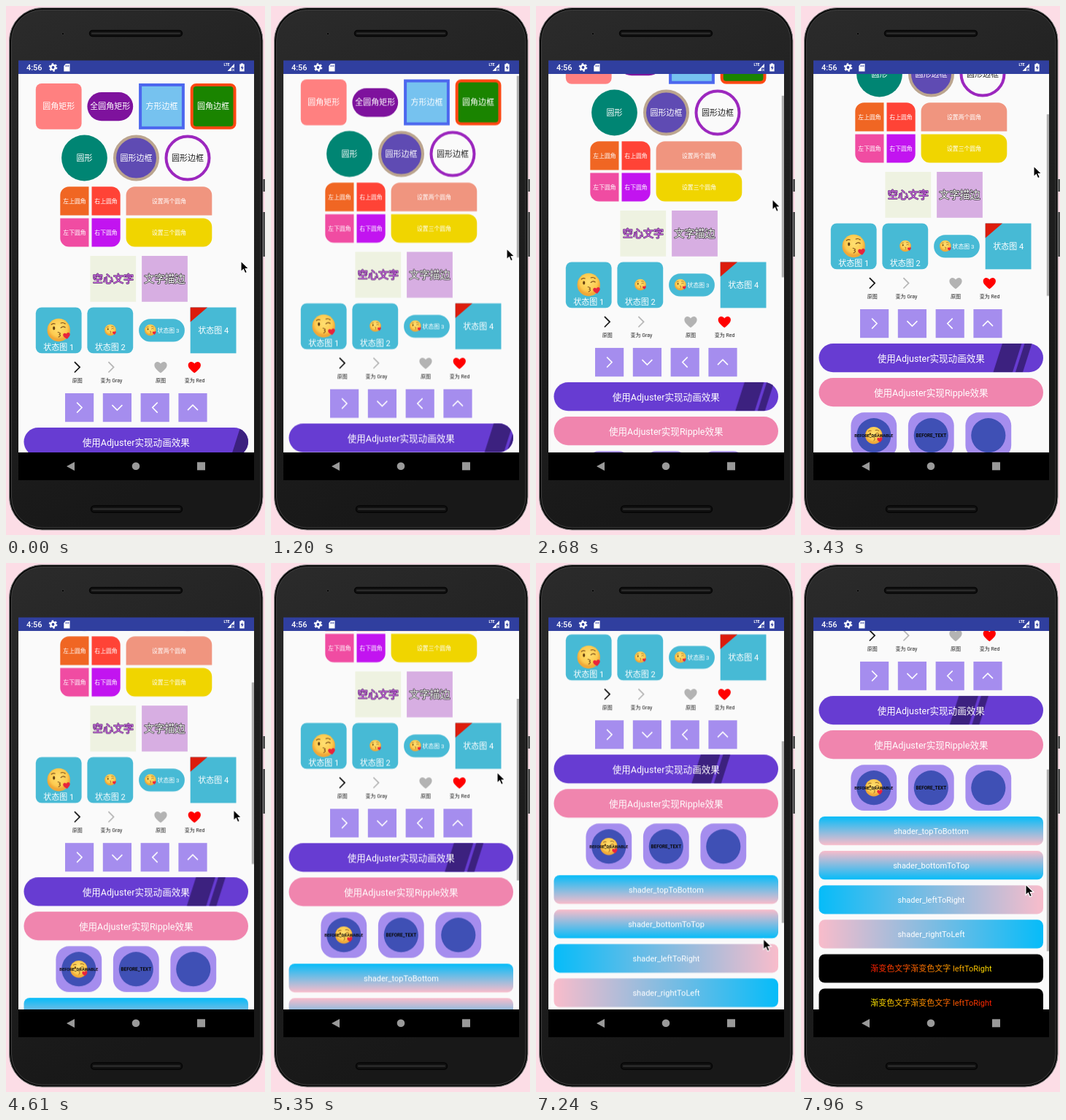
Write an HTML page that moves like this. It is 355 px wide and 724 px high and loops after 8 s.

```html
<!DOCTYPE html>
<html lang="zh-CN">
<head>
<meta charset="utf-8">
<style>
  html, body { margin: 0; width: 100%; height: 100%; overflow: hidden; background: #fcdde6; }
  svg { display: block; width: 355px; height: 724px; }
  text { font-family: Roboto, "Noto Sans CJK SC", "Noto Sans CJK", sans-serif; text-anchor: middle; }
</style>
</head>
<body>
<svg viewBox="0 0 355 724" xmlns="http://www.w3.org/2000/svg">
  <defs>
    <linearGradient id="body" x2=".3" y2="1">
      <stop stop-color="#2b2b2b"/><stop offset=".5" stop-color="#202020"/><stop offset="1" stop-color="#181818"/>
    </linearGradient>
    <linearGradient id="right"><stop stop-color="#06bcf9"/><stop offset="1" stop-color="#f9bccb"/></linearGradient>
    <linearGradient id="left" x1="1" x2="0"><stop stop-color="#06bcf9"/><stop offset="1" stop-color="#f9bccb"/></linearGradient>
    <linearGradient id="down" x2="0" y2="1"><stop stop-color="#06bcf9"/><stop offset="1" stop-color="#f9bccb"/></linearGradient>
    <linearGradient id="up" x2="0" y1="1" y2="0"><stop stop-color="#06bcf9"/><stop offset="1" stop-color="#f9bccb"/></linearGradient>
    <linearGradient id="warm"><stop stop-color="#ff1a00"/><stop offset="1" stop-color="#ffe600"/></linearGradient>
    <linearGradient id="warmBack"><stop stop-color="#ffee00"/><stop offset="1" stop-color="#ff1a00"/></linearGradient>
    <radialGradient id="skin" cy=".4"><stop stop-color="#ffe072"/><stop offset=".75" stop-color="#fdcb50"/><stop offset="1" stop-color="#f0a838"/></radialGradient>
    <clipPath id="screen"><rect x="17" y="93" width="323" height="518"/></clipPath>
    <clipPath id="pill"><rect x="24.5" y="577" width="307.5" height="39.2" rx="19.6"/></clipPath>
    <path id="heart" d="M0 7.5C-5 3.5-8.3.6-8.3-3C-8.3-7.8-2.4-8.8 0-4.8C2.4-8.8 8.3-7.8 8.3-3C8.3.6 5 3.5 0 7.5Z"/>
    <g id="kiss">
      <circle r="15.7" fill="url(#skin)"/>
      <g fill="none" stroke="#7a4c18" stroke-width="1.1" stroke-linecap="round">
        <path d="M-10-7.5Q-8-9.5-5-8.5M3-9.5Q6-11 9-8.5M3-3Q6-6 9-3.5M-1 3Q4 4 1 6Q4 7.5 0 9.5"/>
      </g>
      <ellipse cx="-6.5" cy="-2.5" rx="1.6" ry="2.4" fill="#65400f"/>
      <use href="#heart" transform="translate(11 8) rotate(-8) scale(.58)" fill="#e8243c"/>
    </g>
  </defs>

  <g fill="#4c4c4c"><rect x="351" y="237" width="4" height="17"/><rect x="351" y="282" width="4" height="61"/></g>
  <rect x="4.5" y="2.5" width="347.5" height="714.5" rx="45" fill="#0b0b0b" stroke="#858585"/>
  <rect x="7.5" y="5.5" width="341.5" height="708.5" rx="42" fill="url(#body)" stroke="#484848" stroke-width=".8"/>
  <g fill="#111" stroke="#050505" stroke-width="1.5">
    <rect x="114.5" y="33.5" width="127" height="8" rx="4"/>
    <rect x="116.5" y="684" width="125" height="9" rx="4.5"/>
  </g>
  <path d="M118 37.5H238M120 688.5H238" stroke="#303030" stroke-width="2" stroke-linecap="round"/>
  <circle cx="78" cy="38" r="1.8" fill="#0a0a0a" stroke="#444" stroke-width=".6"/>

  <rect x="17" y="93" width="323" height="518" fill="#fafafa"/>
  <g clip-path="url(#screen)">
    <g id="page"></g>
    <rect id="bar" x="336.8" y="93" width="3.2" height="248.5" fill="#b0b0b0"/>
  </g>

  <rect x="17" y="74.5" width="323" height="18.5" fill="#303f9f"/>
  <g id="status" fill="#fff">
    <circle cx="64.5" cy="84" r="3.1" fill="none" stroke="#fff" stroke-width="2.4"/>
    <circle cx="64.5" cy="84" r="4.9" fill="none" stroke="#fff" stroke-width="1.8" stroke-dasharray="2.5 2.63"/>
    <path d="M82 79H87.5V89.5H79.3V82Z"/>
    <path d="M81.9 81v2.2M83.8 81v2.2M85.7 81v2.2" stroke="#303f9f" stroke-width=".9"/>
    <path d="M313 79V84.5H309V89H303.5Z"/>
    <path d="M310 86l3 3m0-3l-3 3" stroke="#fff" stroke-width="1"/>
    <path d="M322 78.5h3v1h1.7v10h-6.4v-10H322Z"/>
    <path d="M324.2 81l-2.4 4h1.5v3l2.3-4h-1.4Z" fill="#303f9f"/>
  </g>
  <rect x="17" y="611" width="323" height="38"/>
  <g fill="#999"><path d="M94 624V636L83 630Z"/><circle cx="178" cy="629.8" r="5.3"/><rect x="262" y="624.3" width="11" height="11"/></g>

  <path id="cursor" d="M0 0V14.6L3.4 11.5L5.7 16.8L8.4 15.6L6.1 10.5H10.8Z" stroke="#fff" stroke-width="1.1"/>
</svg>
<script>
const LOOP = 8000;
const page = document.getElementById('page');
const parts = [];
const add = s => parts.push(s);

const rect = (x, y, w, h, fill, r = 0, extra = '') =>
  add(`<rect x="${x}" y="${y}" width="${w}" height="${h}" rx="${r}" fill="${fill}" ${extra}/>`);
const circle = (x, y, r, fill, extra = '') => add(`<circle cx="${x}" cy="${y}" r="${r}" fill="${fill}" ${extra}/>`);
const label = (s, x, y, size = 11, fill = '#fff', extra = '') =>
  add(`<text x="${x}" y="${y + size * 0.36}" font-size="${size}" fill="${fill}" ${extra}>${s}</text>`);
const use = (id, x, y, scale, fill = '') =>
  add(`<use href="#${id}" transform="translate(${x} ${y}) scale(${scale})" fill="${fill}"/>`);
const chevron = (x, y, turn, size, color, width) =>
  add(`<path d="M${-size / 2} ${-size}L${size / 2} 0L${-size / 2} ${size}" transform="translate(${x} ${y}) rotate(${turn})" fill="none" stroke="${color}" stroke-width="${width}"/>`);
// Corner radii run clockwise from the top left.
const corners = (x, y, w, h, fill, [a, b, c, d]) =>
  add(`<path fill="${fill}" d="M${x + a} ${y}h${w - a - b}a${b} ${b} 0 0 1 ${b} ${b}v${h - b - c}a${c} ${c} 0 0 1 ${-c} ${c}h${c + d - w}a${d} ${d} 0 0 1 ${-d} ${-d}v${a + d - h}a${a} ${a} 0 0 1 ${a} ${-a}z"/>`);

const BOX = 62.8, COLS = [40.8, 111.4, 182.1, 252.7];
const mid = i => COLS[i] + BOX / 2;

// Rounded and bordered boxes
rect(COLS[0], 106, BOX, BOX, '#ff8080', 8);
rect(COLS[1], 118, BOX, 39.2, '#7e129d', 19.6);
rect(COLS[2] + 2, 108, BOX - 4, BOX - 4, '#76c2ef', 0, 'stroke="#4c67ee" stroke-width="4"');
rect(COLS[3] + 2, 108, BOX - 4, BOX - 4, '#1a8400', 6, 'stroke="#ff4712" stroke-width="4"');
['圆角矩形', '全圆角矩形', '方形边框', '圆角边框'].forEach((s, i) => label(s, mid(i), 137.5));

// Circles
circle(107.5, 208, 31.4, '#008573');
circle(178.5, 208, 29.5, '#5f4bb3', 'stroke="#bba58f" stroke-width="4"');
circle(249, 208, 29.5, '#fafafa', 'stroke="#9c27be" stroke-width="4"');
label('圆形', 107.5, 208);
label('圆形边框', 178.5, 208);
label('圆形边框', 249, 208, 11, '#222');

// Single corners
corners(74.3, 247.2, 39.2, 39.2, '#f06623', [12, 0, 0, 0]);
corners(117.5, 247.2, 39.2, 39.2, '#ff4336', [0, 12, 0, 0]);
corners(74.3, 290.4, 39.2, 39.2, '#f04ca2', [0, 0, 0, 12]);
corners(117.5, 290.4, 39.2, 39.2, '#c214f0', [0, 0, 12, 0]);
corners(164.6, 247.2, 117.7, 39.2, '#f0957f', [12, 12, 0, 0]);
corners(164.6, 290.4, 117.7, 39.2, '#f0d500', [0, 12, 12, 12]);
[['左上圆角', '右上圆角', '设置两个圆角'], ['左下圆角', '右下圆角', '设置三个圆角']].forEach((row, r) =>
  row.forEach((s, i) => label(s, [94, 137, 223.5][i], 267.2 + r * 43.2, 7.85)));

// Outlined text
rect(115.4, 342, BOX, BOX, '#eef2e1');
rect(186.1, 342, BOX, BOX, '#d7aee2');
const outline = 'paint-order="stroke" stroke-linejoin="round" stroke-width="1.3"';
label('空心文字', 147, 373.3, 14.1, '#cf66e4', `${outline} stroke="#5a2a70"`);
label('文字描边', 217.5, 373.3, 14.1, '#fff', `${outline} stroke="#2c2c2c"`);

// State boxes
const teal = '#47bad5';
rect(COLS[0], 412.5, BOX, BOX, teal, 8);
rect(COLS[1], 412.5, BOX, BOX, teal, 8);
rect(COLS[2], 428.2, BOX, 31.4, teal, 15.7);
rect(COLS[3], 412.5, BOX, BOX, teal);
add('<path d="M252.7 412.5h23.3l-23.3 20z" fill="#dc1c0c"/>');
use('kiss', 72.2, 443.5, 1);
use('kiss', 143, 443.5, 0.5);
use('kiss', 197.8, 443.5, 0.5);
label('状态图 1', 72.2, 467.3);
label('状态图 2', 142.8, 467.3);
label('状态图 3', 222.5, 443.9, 7.85);
label('状态图 4', 284.2, 443.9);

// Tinted icons
chevron(97.5, 494.3, 0, 7.2, '#111', 1.7);
chevron(144, 494.3, 0, 7.2, '#b5b5b5', 1.7);
use('heart', 212, 494.5, 1.04, '#b3b3b3');
use('heart', 258.3, 494.5, 1.04, '#ff0000');
[['原图', 97.7], ['变为 Gray', 144.5], ['原图', 212], ['变为 Red', 258.5]].forEach(([s, x]) => label(s, x, 512.6, 7, '#222'));

[81, 132.8, 184.6, 236.4].forEach((x, i) => {
  rect(x, 530, 39.2, 39.2, '#a58dee');
  chevron(x + 19.6, 549.6, i * 90, 7, '#fff', 1.5);
});

// Wide buttons
rect(24.5, 577, 307.5, 39.2, '#673cd2', 19.6);
add('<g clip-path="url(#pill)"><path id="stripes" fill="#3c217f" d="M0 577h26.5l-12.5 39.2h-26.5zM30.5 577h10l-12.5 39.2h-10z"/></g>');
label('使用Adjuster实现动画效果', 178.3, 597, 12.56);
rect(24.5, 624.1, 307.5, 39.2, '#f085ae', 19.6);
label('使用Adjuster实现Ripple效果', 178.3, 644, 12.56);

[68.4, 146.9, 225.4].forEach(x => {
  rect(x, 671.3, BOX, BOX, '#a58dee', 18);
  circle(x + BOX / 2, 702.7, 23.6, '#3f50b5');
});
use('kiss', 99.8, 702.7, 0.75);
label('BEFORE_DRAWABLE', 99.8, 702.7, 5.7, '#0a0a0a', 'font-weight="700"');
label('BEFORE_TEXT', 178.3, 702.7, 6.4, '#0a0a0a', 'font-weight="700"');

// Gradient rows
const rows = [
  ['url(#down)', 'shader_topToBottom'], ['url(#up)', 'shader_bottomToTop'],
  ['url(#right)', 'shader_leftToRight'], ['url(#left)', 'shader_rightToLeft'],
  ['#000', '渐变色文字渐变色文字 leftToRight', 'url(#warm)'],
  ['#000', '渐变色文字渐变色文字 leftToRight', 'url(#warmBack)'],
];
rows.forEach(([fill, s, ink], i) => {
  const y = 742 + i * 47.1;
  rect(24.5, y, 307.5, 39.2, fill, 8);
  label(s, 178.5, y + 19.8, 11, ink);
});
page.innerHTML = parts.splice(0).join('');

label('4:56', 38.8, 84.2, 11, '#fff', 'font-weight="500"');
label('LTE', 302.6, 80.3, 5, '#fff', 'font-weight="700"');
document.getElementById('status').insertAdjacentHTML('beforeend', parts.join(''));

const play = (id, steps, style) => document.getElementById(id).animate(
  steps.map(([t, ...v]) => ({ offset: t / LOOP, ...style(...v) })),
  { duration: LOOP, iterations: Infinity });
const move = (x, y) => ({ transform: `translate(${x}px, ${y}px)` });

const scroll = [[0, 0], [1000, 0], [1870, 24], [2680, 62], [3430, 115], [3850, 140], [4550, 143],
  [5350, 193.5], [5900, 256], [6380, 265.5], [6800, 265.5], [7960, 395], [8000, 398]];
play('page', scroll, y => move(0, -y));
play('bar', scroll, y => move(0, y * 0.48));
play('bar', [[0, 0], [1000, 0], [1060, 1], [8000, 1]], opacity => ({ opacity }));
play('stripes', [[0, 321], [8000, 215.8]], x => move(x, 0));
play('cursor', [[0, 322, 349], [850, 322, 346], [1870, 325, 305.5], [2680, 324, 264.5], [3430, 319, 219],
  [3850, 317, 195], [4550, 312, 342], [5350, 310, 286.5], [5900, 310, 226], [6380, 314, 439],
  [6780, 314, 562], [7960, 308, 440], [8000, 308, 437]], move);
</script>
</body>
</html>
```
